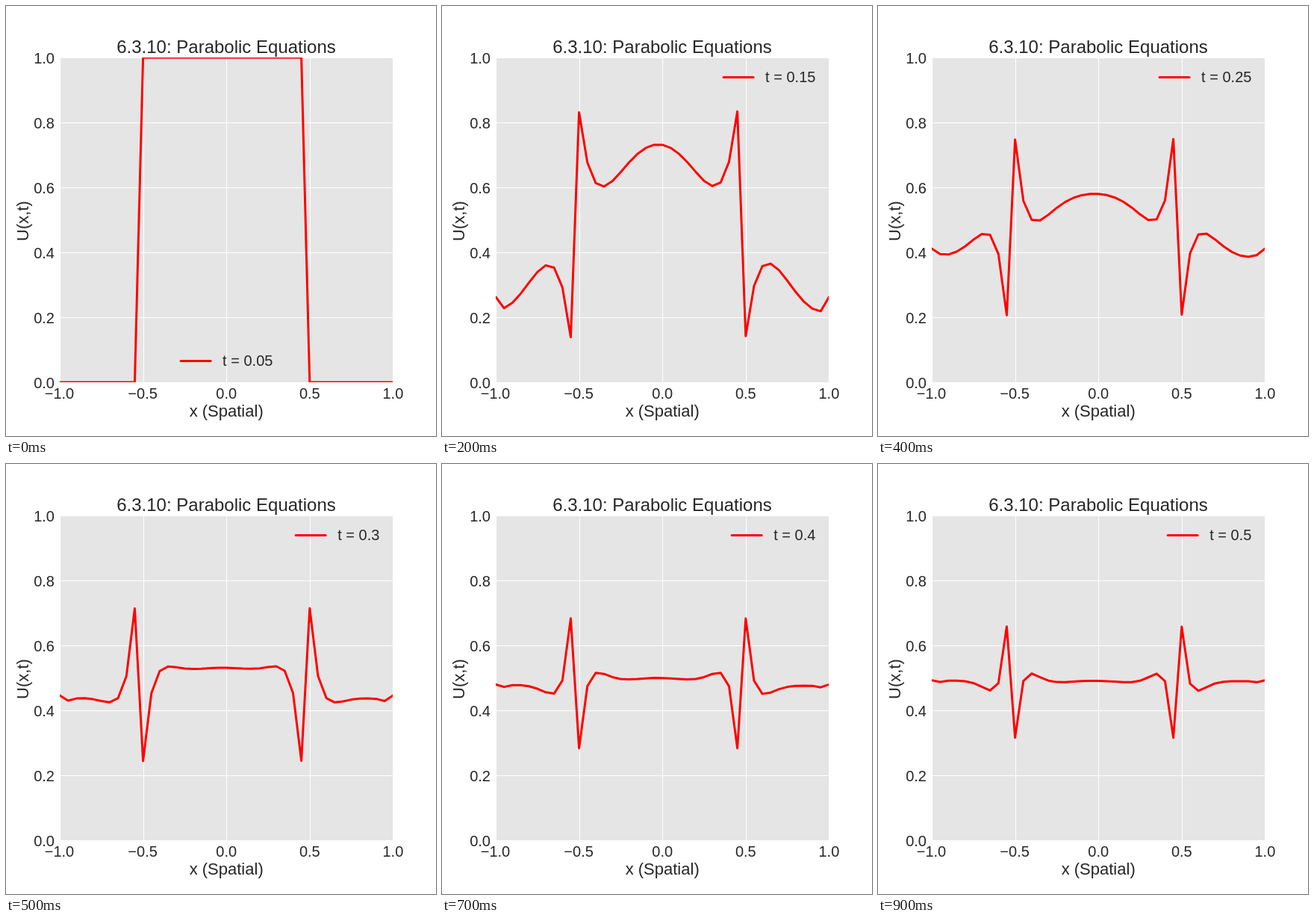
Recreate the animation shown at these times as an HTML page. Size 576 by 576 pixels, loop 1 s.

```html
<!DOCTYPE html>
<html lang="en">
<head>
<meta charset="utf-8">
<title>Parabolic Equations</title>
<style>
  html, body { margin: 0; width: 100%; height: 100%; overflow: hidden; background: #fff; }
  svg { display: block; width: 576px; height: 576px; }
  text { font: 20px "Liberation Sans", Arial, sans-serif; fill: #262626; }
  .mid { text-anchor: middle; }
  .end { text-anchor: end; }
  .title { font-size: 24px; }
  .label { font-size: 22px; }
  .line { fill: none; stroke: #f00; stroke-width: 3; stroke-linecap: round; stroke-linejoin: round; }
</style>
</head>
<body>
<svg viewBox="0 0 576 576">
  <clipPath id="plot"><rect x="72" y="69" width="446" height="435"/></clipPath>
  <rect x="72" y="69" width="446" height="435" fill="#e5e5e5"/>
  <g id="grid" stroke="#fff" clip-path="url(#plot)"></g>
  <g id="ticks"></g>
  <text class="mid title" x="295" y="63">6.3.10: Parabolic Equations</text>
  <text class="mid label" x="295.2" y="550">x (Spatial)</text>
  <text class="mid label" transform="translate(30 288) rotate(-90)">U(x,t)</text>
  <path id="curve" class="line" clip-path="url(#plot)"/>
  <g id="legend">
    <path class="line" d="M-56 -6.5h40"/>
    <text id="time"></text>
  </g>
</svg>
<script>
const $ = id => document.getElementById(id);
const CELLS = 40, STEP = 0.05, FRAMES = 10, FRAME_MS = 100;
const px = x => 295.2 + 223.2 * x;
const py = u => 504 - 434.88 * u;

function addAxes() {
  let grid = "", ticks = "";
  for (let i = 0; i <= 4; i++) {
    const v = -1 + i / 2, x = px(v), name = v.toFixed(1).replace("-", "\u2212");
    grid += `<path d="M${Math.round(x) + 0.5} 69V504"/>`;
    ticks += `<text class="mid" x="${v < 0 ? x - 0.5 : x}" y="526">${name}</text>`;
  }
  for (let i = 0; i <= 5; i++) {
    const y = Math.round(py(i / 5));
    grid += `<path d="M72 ${y + 0.5}H518"/>`;
    ticks += `<text class="end" x="65" y="${y + 8}">${(i / 5).toFixed(1)}</text>`;
  }
  $("grid").innerHTML = grid;
  $("ticks").innerHTML = ticks;
}

// Fourier series of the exact solution at x = ±1
function edgeValue(t) {
  let u = 0.5;
  for (let k = 0; k < 30; k++) {
    const w = Math.PI * (2 * k + 1);
    u -= 2 * (-1) ** k / w * Math.exp(-w * w * t);
  }
  return u;
}

// One Crank-Nicolson step: solve for the midpoint, then extrapolate.
// The edges are held during the solve and set to the exact value after it.
function advance(u, t) {
  const r = 1 / (2 * STEP), c = [0], mid = [u[0]];
  for (let i = 1; i < CELLS; i++) {
    const m = 1 + 2 * r - r * c[i - 1];
    c[i] = r / m;
    mid[i] = (u[i] + r * mid[i - 1]) / m;
  }
  mid[CELLS] = u[CELLS];
  for (let i = CELLS - 1; i > 0; i--) mid[i] += c[i] * mid[i + 1];
  const next = mid.map((v, i) => 2 * v - u[i]);
  next[0] = next[CELLS] = edgeValue(t);
  return next;
}

const toPath = u => "M" + u.map((v, i) => `${px(i * 0.05 - 1).toFixed(2)} ${py(v).toFixed(2)}`).join("L");

let u = Array.from({ length: CELLS + 1 }, (_, i) => i >= 10 && i < 30 ? 1 : 0);
const paths = [];
for (let n = 0; n < FRAMES; n++) {
  if (n) u = advance(u, n * STEP);
  paths.push(toPath(u));
}

let shown = -1;
function draw() {
  const n = Math.floor(performance.now() / FRAME_MS) % FRAMES;
  if (n !== shown) {
    shown = n;
    const label = String(+((n + 1) * STEP).toFixed(2));
    const x = n ? (label.length > 3 ? 433.1 : 444.2) : 290.1;
    $("curve").setAttribute("d", paths[n]);
    $("time").textContent = "t = " + label;
    $("legend").setAttribute("transform", `translate(${x} ${n ? 102 : 482})`);
  }
  requestAnimationFrame(draw);
}

addAxes();
draw();
</script>
</body>
</html>
```
